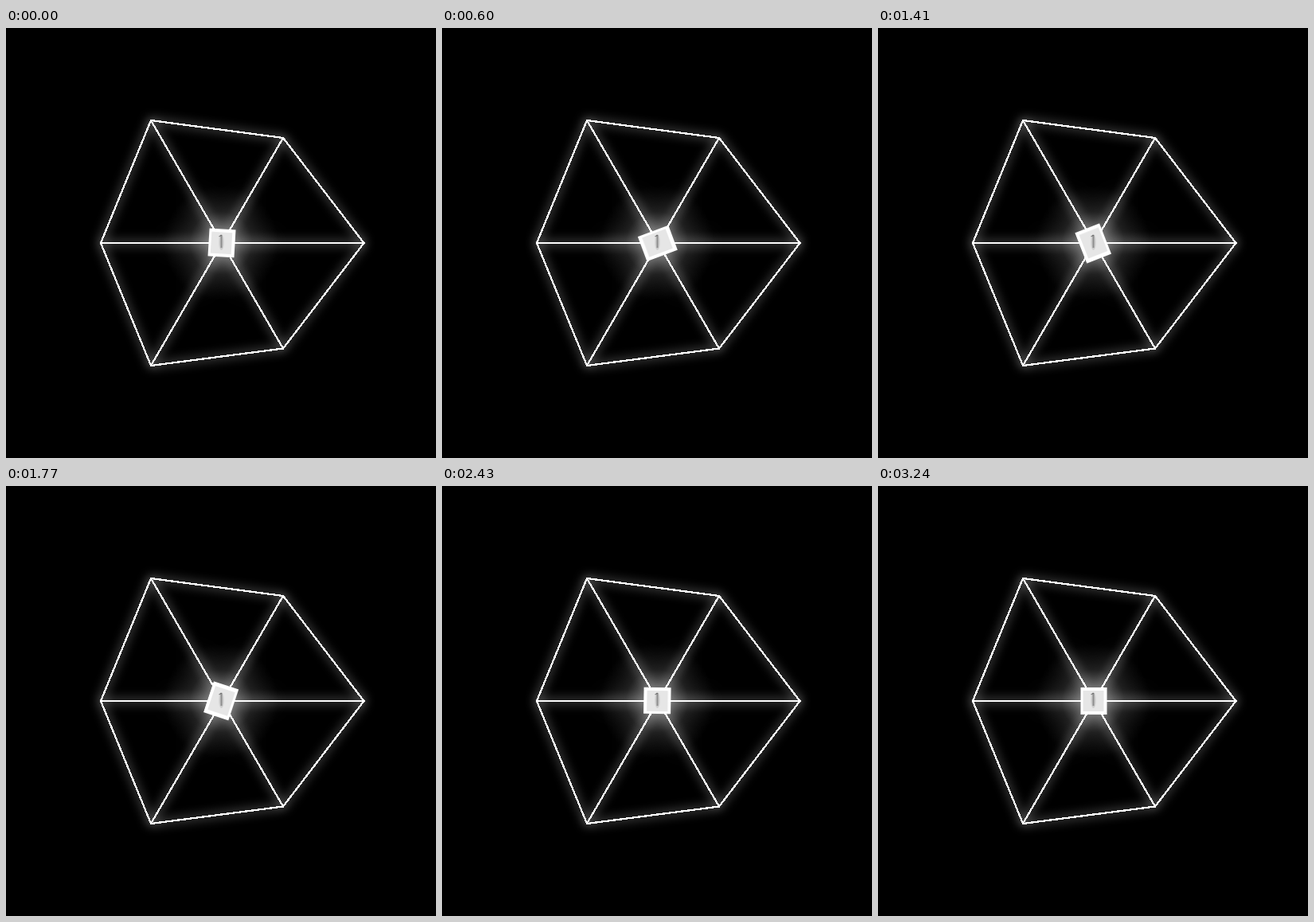
These frames come from a looping animation (540 by 540 pixels, 3270 ms). An HTML page without scripts:

```html
<!DOCTYPE html>
<html lang="en">
<head>
<meta charset="utf-8">
<title>Glowing web</title>
<style>
  html, body { margin: 0; width: 100%; height: 100%; overflow: hidden; background: #000; }
  svg { display: block; width: 100vw; height: 100vh; }
  .web { fill: none; stroke: #fff; stroke-width: 2; }
  .sharp { stroke-width: 2.3; shape-rendering: crispEdges; }
  .spin { animation: spin 3270ms linear -30ms infinite; }
  .stretch { animation: stretch 817.5ms -30ms infinite; }
  @keyframes spin { to { transform: rotate(360deg); } }
  /* height follows |sin| of twice the angle */
  @keyframes stretch {
    0% { transform: scaleY(1); animation-timing-function: cubic-bezier(.39, .575, .565, 1); }
    50% { transform: scaleY(1.33); animation-timing-function: cubic-bezier(.47, 0, .745, .715); }
    100% { transform: scaleY(1); }
  }
</style>
</head>
<body>
<svg viewBox="0 0 540 540">
  <defs>
    <path id="rim" d="M449.5 270 348 402.5 182 424 119 270 182 116 348 138Z"/>
    <path id="spokes" d="M119 270H449.5M182 116 348 402.5M348 138 182 424"/>
    <filter id="soft" filterUnits="userSpaceOnUse" x="0" y="0" width="540" height="540" color-interpolation-filters="sRGB">
      <feGaussianBlur stdDeviation="6.5"/>
    </filter>
    <filter id="wide" filterUnits="userSpaceOnUse" x="0" y="0" width="540" height="540" color-interpolation-filters="sRGB">
      <feGaussianBlur stdDeviation="13"/>
    </filter>
    <radialGradient id="halo">
      <stop offset="0" stop-color="#fff" stop-opacity=".4"/>
      <stop offset=".3" stop-color="#fff" stop-opacity=".26"/>
      <stop offset=".55" stop-color="#fff" stop-opacity=".09"/>
      <stop offset="1" stop-color="#fff" stop-opacity="0"/>
    </radialGradient>
  </defs>
  <rect width="540" height="540"/>

  <g class="web" filter="url(#soft)">
    <use href="#rim"/>
    <use href="#spokes"/>
  </g>
  <path class="web" filter="url(#wide)" d="M205 270H335M238 213 302 327M302 213 238 327"/>
  <circle cx="270" cy="270" r="72" fill="url(#halo)"/>
  <g class="web sharp">
    <use href="#rim"/>
    <use href="#spokes"/>
  </g>

  <g transform="translate(270.5 270)">
    <g class="spin">
      <g class="stretch">
        <rect x="-16.5" y="-16.75" width="33" height="33.5" fill="#fff" shape-rendering="crispEdges"/>
        <rect x="-13" y="-13" width="26" height="26" fill="#e6e6e6"/>
      </g>
    </g>
    <ellipse cy="-1" rx="3" ry="10" fill="#000" opacity=".12"/>
    <path d="M-3-8 0-10V6" fill="none" stroke="#000" stroke-width="1" opacity=".6"/>
  </g>
</svg>
</body>
</html>
```
